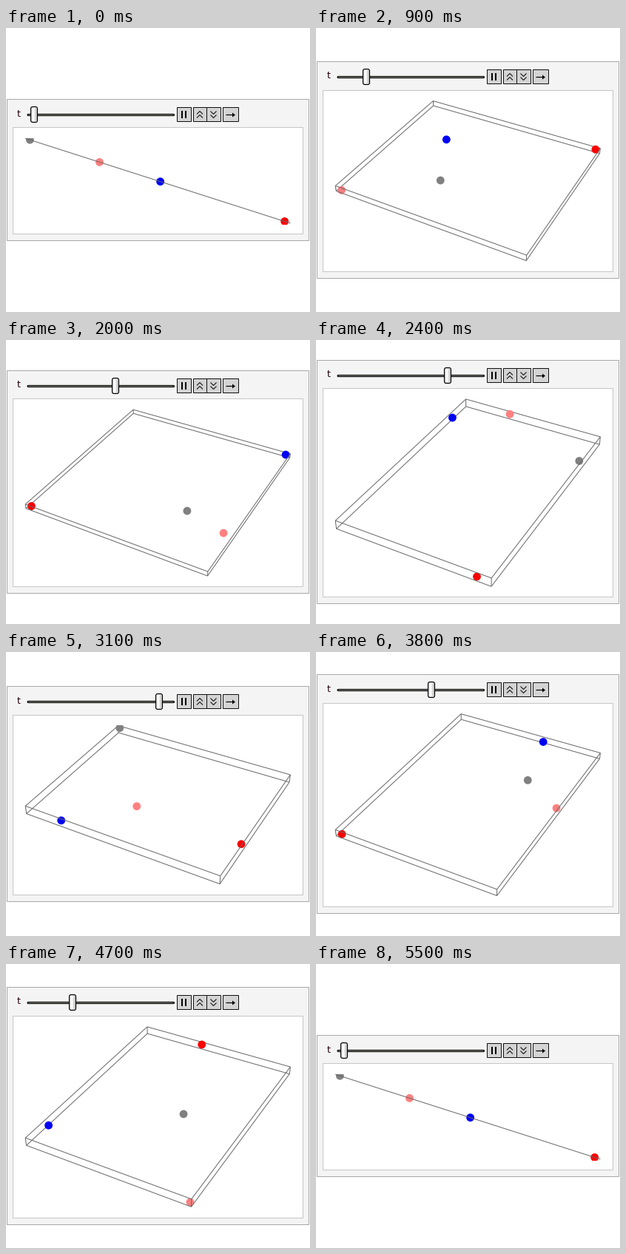
Write a matplotlib script that moves like this. It is 411 by 384 pixels and loops after 6 s.

```python
import itertools

import matplotlib.pyplot as plt
import numpy as np
from matplotlib.animation import FuncAnimation
from matplotlib.patches import Circle, FancyBboxPatch, Polygon, Rectangle

W, H, DPI = 411, 384, 100
PX = 72 / DPI

# Orbits of the inner planets: radius, period in years, inclination, colour
RADIUS = np.array([0.387, 0.723, 1.0, 1.524])
PERIOD = np.array([0.2408, 0.6152, 1.0, 1.881])
TILT = np.radians([7.0, 3.39, 0.0, 1.85])
COLORS = ["#808080", "#ff8080", "#0000f4", "#fa0000"]
SPAN = 1.88

# Perspective camera aimed at the middle of the box
EYE = np.array([1.3, -2.4, 2.0])
DIST = np.linalg.norm(EYE)
FORWARD = -EYE / DIST
RIGHT = np.array([2.4, 1.3, 0]) / np.hypot(2.4, 1.3)
UP = np.cross(RIGHT, FORWARD)

CORNERS = np.array(list(itertools.product((-0.5, 0.5), repeat=3)))
EDGES = [(i, j) for i, j in itertools.combinations(range(8), 2)
         if np.sum(CORNERS[i] != CORNERS[j]) == 1]

LEFT, VIEW_W, MID_Y = 26.2, 358.2, 206.6

fig = plt.figure(figsize=(W / DPI, H / DPI), dpi=DPI, facecolor="white")
ax = fig.add_axes([0, 0, 1, 1])


def progress(n):
    """Slider position 0..1: rests at zero, runs up, then back down."""
    step = min(n - 4, 25, 55 - n)
    return max(0.0, 1 - (25.5 - step) * 0.0407)


def planets(t):
    angle = 2 * np.pi * t / PERIOD
    x, y = RADIUS * np.cos(angle), RADIUS * np.sin(angle)
    return np.column_stack([x, y, y * np.sin(TILT)])


def project(p):
    depth = DIST + p @ FORWARD
    return np.column_stack([p @ RIGHT, -(p @ UP)]) / depth[:, None], depth


def line(xs, ys, color="black", width=1.0, z=2, cap="butt"):
    ax.plot(xs, ys, color=color, lw=width * PX, zorder=z, snap=False,
            solid_capstyle=cap, solid_joinstyle="miter")


def box(x0, y0, x1, y1, fill, edge, z=1):
    ax.add_patch(Rectangle((x0, y0), x1 - x0, y1 - y0, facecolor=fill,
                           edgecolor=edge, lw=PX, zorder=z, snap=False))


def draw_scene(t):
    """Return the height of the view and a function that paints it."""
    pts = planets(t)
    low, high = pts.min(axis=0), pts.max(axis=0)
    size = (high - low) * 1.04
    unit = size.max()
    corners, _ = project(CORNERS * size / unit)
    dots, depth = project((pts - (low + high) / 2) / unit)

    lo, hi = corners.min(axis=0), corners.max(axis=0)
    scale = VIEW_W / (hi[0] - lo[0])
    height = (hi[1] - lo[1]) * scale
    origin = np.array([LEFT, MID_Y - height / 2])
    corners = (corners - lo) * scale + origin
    dots = (dots - lo) * scale + origin

    def paint():
        def in_front(edge):
            a, b = CORNERS[edge[0]], CORNERS[edge[1]]
            return a[0] == b[0] == 0.5 or a[1] == b[1] == -0.5

        seen = set()
        for edge in sorted(EDGES, key=in_front, reverse=True):
            ends = corners[list(edge)]
            key = tuple(np.round(ends, 2).ravel())
            # a flat box folds several edges into one
            if key in seen or np.ptp(ends, axis=0).max() < 0.01:
                continue
            seen.add(key)
            line(ends[:, 0], ends[:, 1], "#686868", 1.0,
                 9 if in_front(edge) else 4)

        clip = Rectangle((LEFT - 1, origin[1] - 0.5), VIEW_W + 2,
                         height + 2.6, transform=ax.transData)
        for k in range(4):
            dot = Circle(dots[k], 5.4, facecolor=COLORS[k], lw=0,
                         zorder=6 + 0.1 * (4 - depth[k]))
            ax.add_patch(dot)
            dot.set_clip_path(clip)

    return height, paint


def draw_slider(cy, u):
    line([30, 226.5], [cy, cy], "black", 3.2, 2, "round")
    line([30, 226.5], [cy, cy], "#868a7c", 1.1, 3)
    cx, mid = round(38 + 180 * u), cy - 0.5
    ax.add_patch(FancyBboxPatch((cx - 4.5, mid - 10.5), 9, 21,
                                boxstyle="round,pad=0,rounding_size=2.5",
                                facecolor="#d0d0d0", edgecolor="black",
                                lw=1.1 * PX, zorder=4, snap=False))
    for k, shade in enumerate((0.9, 1, 0.98, 0.93, 0.87, 0.8, 0.7)):
        ax.add_patch(Rectangle((cx - 3.5 + k, mid - 9), 1, 18, lw=0,
                               facecolor=str(shade), zorder=5))


def draw_buttons(cy):
    for x0, x1 in ((231.5, 250.5), (253.5, 271.5),
                   (271.5, 290.5), (293.5, 314.5)):
        box(x0, cy - 9.5, x1, cy + 9.5, "#d4d4d4", "#101010", 3)
    for x in (238, 243):
        line([x, x], [cy - 5, cy + 5], "black", 2, 4)
    for x, flip in ((262, 1), (280.5, -1)):
        for dy in (-2.5, 2.5):
            line([x - 4, x, x + 4],
                 [cy + dy + 2 * flip, cy + dy - 2 * flip, cy + dy + 2 * flip],
                 "#101010", 1.1, 4)
    line([297.5, 307], [cy + 0.5, cy + 0.5], "black", 1.2, 4)
    ax.add_patch(Polygon([(306, cy - 2.5), (310, cy + 0.5), (306, cy + 3.5)],
                         facecolor="black", lw=0, zorder=4))


def draw(n):
    ax.clear()
    ax.set_axis_off()
    u = progress(n)
    view_h, paint = draw_scene(u * SPAN)

    inner = round(view_h + 29.2)
    outer = (inner + 47) | 1
    top = (H - outer) / 2
    bottom = H - top
    box(1.5, top, 409.5, bottom, "#f4f4f4", "#a8a8a8", 0)
    box(9.5, bottom - 9 - inner, 401.5, bottom - 9, "white", "#c6c6c6", 1)

    cy = top + 21
    ax.text(14.5, cy + 2, "t", family="DejaVu Sans", size=12.5 * PX,
            color="#280014", va="baseline", ha="left", zorder=4)
    draw_slider(cy, u)
    draw_buttons(cy - 0.5)
    paint()

    ax.set_xlim(0, W)
    ax.set_ylim(H, 0)
    return []


anim = FuncAnimation(fig, draw, frames=60, interval=100, init_func=lambda: [],
                     repeat=True, repeat_delay=0, blit=False)
plt.show()
```
